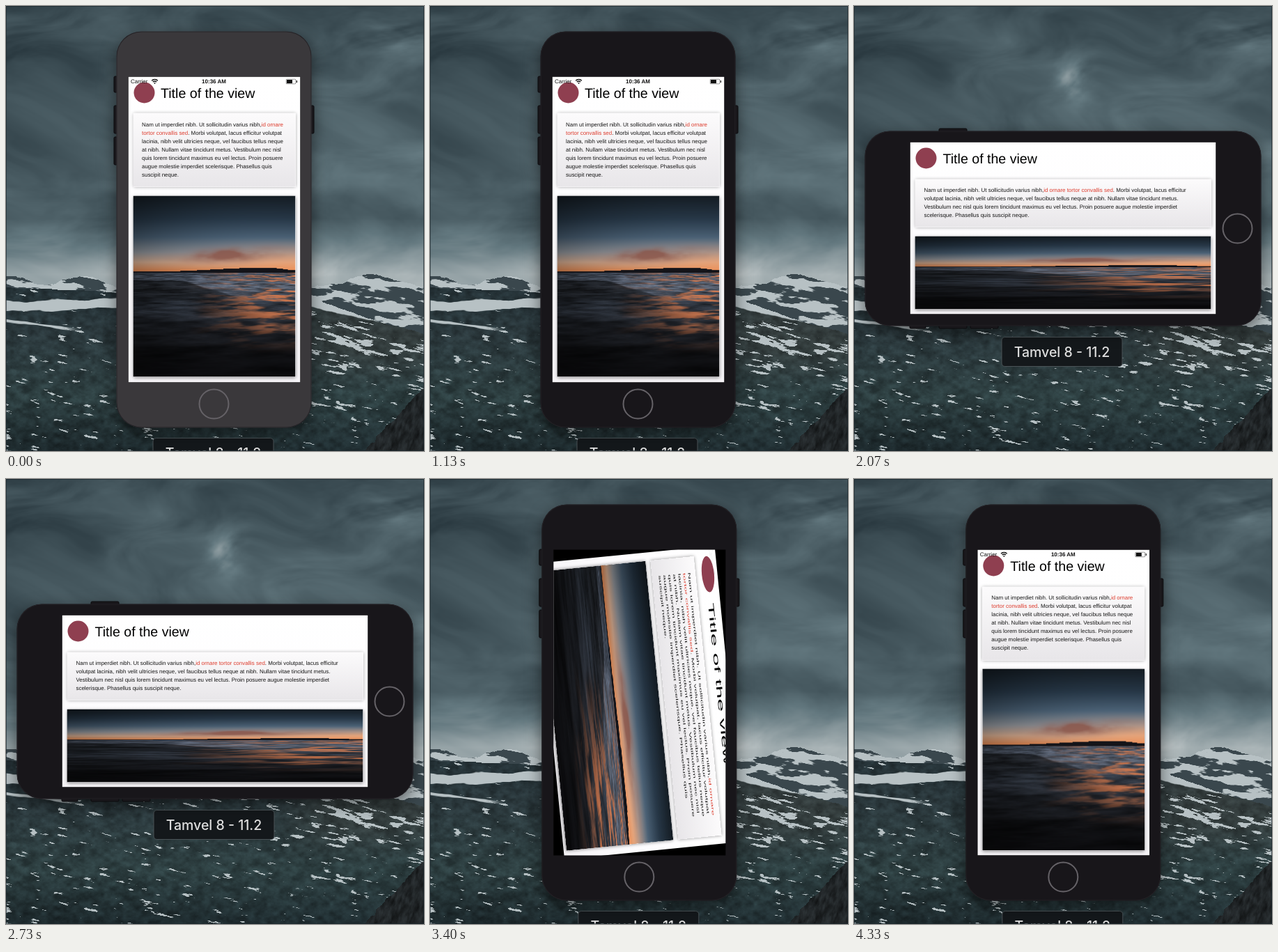
An HTML page with a canvas that plays this animation: 600x639 px, repeating every 4390 ms.

```html
<!DOCTYPE html>
<html lang="en">
<head>
<meta charset="utf-8">
<title>Rotating view</title>
<style>
  html, body { margin: 0; width: 100%; height: 100%; overflow: hidden; background: #2c3d43; }
  #stage { position: absolute; left: 0; top: 0; width: 600px; height: 639px; overflow: hidden; }
  #stage div, #stage canvas, #stage svg { position: absolute; box-sizing: border-box; }
  #edge { inset: 0; border: 1px solid rgba(25, 38, 44, .7); }
  #shade { inset: 0; filter: drop-shadow(0 7px 11px rgba(0, 0, 0, .5)); }
  #phone { left: 0; top: 0; width: 0; height: 0; }
  .key { width: 7.5px; background: #19171b; border: 1px solid #0b0a0c; border-radius: 2px; }
  #body { left: -140px; top: -284.5px; width: 280px; height: 569px; border-radius: 36px;
    background: #18161a; box-shadow: inset 0 0 0 1px #242226; }
  #home { left: -22px; top: 228.5px; width: 44px; height: 44px; border-radius: 50%; border: 2px solid #656267; }
  #screen { left: -123.5px; top: -219.5px; width: 247px; height: 439px; overflow: hidden; background: #000; }
  .view { background: linear-gradient(#fff, #fdfcfe 60%, #f6f4f7); color: #000; }
  .view, #bar { font-family: "Liberation Sans", Arial, sans-serif; text-rendering: geometricPrecision; white-space: pre; }
  .dot { left: 8px; top: 8px; width: 30px; height: 30px; border-radius: 50%; background: #8f3f50; }
  .title { left: 47px; top: 12px; font-size: 19.6px; line-height: 24px; }
  .card { left: 7px; right: 7px; top: 52.5px; background: linear-gradient(#fcfbfc, #e8e6e9);
    box-shadow: 0 0 5px rgba(0, 0, 0, .42); }
  .text { left: 13px; top: 10.5px; font-size: 7.94px; line-height: 12.07px; color: #161616; }
  .text b { font-weight: 400; color: #dd3b2c; }
  .pic { left: 7px; box-shadow: 0 1px 5px rgba(0, 0, 0, .5); }
  #bar { font-size: 8px; line-height: 10px; color: #111; }
  #bar div { top: 2px; }
  #label { width: 174px; height: 43px; border: 1px solid #4b5357; border-radius: 5px; background: #14181b;
    color: #dedede; font: 500 19.5px/42px Inter, "Open Sans", sans-serif; text-align: center; white-space: pre; }
</style>
</head>
<body>
<div id="stage">
  <canvas id="land" width="600" height="639"></canvas>
  <div id="label">Tamvel 8 - 11.2</div>
  <div id="shade">
    <div id="phone">
      <div class="key" style="left:-144.5px;top:-220px;height:24px"></div>
      <div class="key" style="left:-144.5px;top:-178.5px;height:41px"></div>
      <div class="key" style="left:-144.5px;top:-133.5px;height:41px"></div>
      <div class="key" style="left:136px;top:-178.5px;height:41px"></div>
      <div id="body"></div>
      <div id="home"></div>
      <div id="screen">
        <div id="bar">
          <div style="left:4px">Carrier</div>
          <svg style="left:33px;top:3px" width="10" height="8" viewBox="0 0 10 8" fill="none" stroke="#111" stroke-width="1.4">
            <path d="M.6 2.7Q5-1.2 9.4 2.7M2.3 4.6Q5 2.2 7.7 4.6"/><path d="M5 7.6L3.6 6.1Q5 5 6.4 6.1Z" fill="#111" stroke="none"/>
          </svg>
          <div style="left:0;right:0;text-align:center;font-weight:700">10:36 AM</div>
          <svg style="right:4px;top:3px" width="17" height="8" viewBox="0 0 17 8">
            <rect x=".5" y=".5" width="14" height="7" rx="1.5" fill="none" stroke="#777"/>
            <path d="M1.5 1.5H9.5V6.5H1.5ZM15.5 2.5H16.5V5.5H15.5Z" fill="#111"/>
          </svg>
        </div>
      </div>
    </div>
  </div>
  <div id="edge"></div>
</div>
<script>
const LOOP = 4390, STEP = 200 / 3, SPIN = 300, LAG = 45;
const GO = 1437, RETURN = 3354, FOCUS = 270;
const $ = id => document.getElementById(id);
const clamp = v => Math.max(0, Math.min(1, v));
const mix = (a, b, p) => a + (b - a) * p;
const blend = (a, b, p) => a.map((v, i) => mix(v, b[i], p));
const smooth = v => v * v * (3 - 2 * v);
const rise = (v, a, b) => smooth(clamp((v - a) / (b - a)));
const bell = (v, mid, width) => Math.exp(-(((v - mid) / width) ** 2));

// seeded smooth noise
let seed = 11;
const grid = Float32Array.from({ length: 4096 }, () => (seed = seed * 16807 % 2147483647) / 2147483647);
const cell = (i, j) => grid[(i * 157 + j * 1031) & 4095];
function noise(x, y) {
  const i = Math.floor(x), j = Math.floor(y), u = smooth(x - i), v = smooth(y - j);
  return mix(mix(cell(i, j), cell(i + 1, j), u), mix(cell(i, j + 1), cell(i + 1, j + 1), u), v);
}
function fbm(x, y, octaves = 4) {
  let sum = 0, amp = 1, total = 0;
  for (; octaves--; amp /= 2, x = x * 2 + 5.3, y = y * 2 + 1.7) {
    sum += amp * noise(x, y);
    total += amp;
  }
  return sum / total;
}

// colour (or value) along key points [position, ...values]
function along(t, keys) {
  let k = 1;
  while (k < keys.length - 1 && t > keys[k][0]) k++;
  const [a, ...from] = keys[k - 1], [b, ...to] = keys[k];
  return blend(from, to, clamp((t - a) / (b - a)));
}
function paint(canvas, shader) {
  const { width, height } = canvas, c = canvas.getContext('2d');
  const img = c.createImageData(width, height);
  for (let y = 0, i = 0; y < height; y++)
    for (let x = 0; x < width; x++, i += 4) img.data.set([...shader(x, y).map(Math.round), 255], i);
  c.putImageData(img, 0, 0);
}

const SKY = [[0, 32, 46, 53], [.5, 98, 119, 126], [1, 192, 199, 200]];
const SKY_LIGHT = [[0, .24], [100, .27], [200, .33], [255, .42], [305, .33], [345, .58], [385, .85]];
const HILL = [[0, 404], [160, 411], [300, 440], [435, 417], [520, 449], [600, 470]];
const GROUND = [[400, 37, 50, 55], [470, 42, 55, 59], [560, 46, 64, 66], [639, 33, 47, 51]];
const SNOW = [183, 193, 196];

function sky(x, y) {
  const warp = fbm(x / 150, y / 90, 2) * 2;
  const cloud = fbm(x / 100 + warp, y / 52 + warp, 5) - .5;
  const spots = .22 * bell(x, 316, 26) * bell(y, 108, 28) + .16 * bell(x, 555, 60) * bell(y, 38, 26);
  const light = along(y, SKY_LIGHT)[0] + (x - 300) / 6000 + cloud * .42 + spots * (1 + cloud * 4);
  return along(clamp(light), SKY);
}
function farRange(x, y) {
  const height = 17 * bell(x, 105, 35) + 14 * bell(x, 0, 45) + 17 * bell(x, 528, 50);
  if (y < 404 - height + (fbm(x / 16, 3) - .5) * 10) return sky(x, y);
  const patch = fbm(x / 30, (y - .15 * x) / 9) + .14 * bell(x, 555, 40) * bell(y, 430, 14);
  return blend([58, 71, 77], SNOW, rise(patch, .54, .6));
}
function land(x, y) {
  if (639 - y + (fbm(x / 14, y / 14) - .5) * 14 < (x - 515) * 1.1) {
    const n = fbm(x / 5, (x + y) / 9);
    return [30, 34, 36].map(v => v * (.4 + 1.3 * n));
  }
  const top = along(x, HILL)[0] + (fbm(x / 20, 9) - .5) * 4;
  if (y < top) return farRange(x, y);
  const olive = rise(x, 360, 480) * (1 - rise(y, 480, 560));
  const base = blend(along(y, GROUND), [56, 62, 60], olive * .6);
  const shade = .65 + .7 * fbm(x / 9, y / 7) - .15 * bell(y, 640, 60) * bell(x, 60, 200);
  const wob = fbm(x / 35, y / 12);
  const band = (1 - rise(x, 170, 240)) * rise(9 * wob + 3 - Math.abs(y - 431 + x * .03), 0, 1.5);
  const strip = (1 - rise(x, 75, 110)) * rise(5 * wob - Math.abs(y - 451 - x * .13), 0, 1.5);
  const crest = rise(x, 425, 440) * rise((535 - x) * .14 + 1 - (y - top), 0, 2);
  const where = bell(y, 490 + (x - 500) * .16, 32) * rise(x, 300, 520) + .5 * bell(x, 325, 55) * bell(y, 524, 9);
  const streaks = rise(fbm(x / 20, (y - x * .2) / 4.5) + .16 * where, .72, .77);
  return blend(base.map(v => v * shade), SNOW, Math.max(band, strip, crest, streaks));
}

const DUSK = [[0, 25, 35, 44], [.3, 45, 64, 82], [.55, 82, 106, 128], [.75, 158, 162, 168], [.88, 228, 184, 154], [1, 232, 138, 82]];
const WATER = [[0, 66, 75, 90], [.14, 82, 90, 104], [.3, 52, 59, 70], [.5, 30, 33, 39], [.75, 16, 17, 20], [1, 9, 9, 11]];

function sea(x, y) {
  const u = x / 234, v = y / 261, horizon = .415;
  const coast = horizon - .018 * rise(u, .2, .75) + .012 * rise(u, .85, 1);
  if (v < coast) {
    const dim = 1 - .5 * (1 - u) ** 2 * (1 - v) - .2 * u * (1 - v / horizon);
    const warm = blend(along(v / horizon, DUSK), [240, 150, 95], .5 * rise(u, .4, 1) * rise(v, .22, .38));
    const puff = bell(u, .6, .26) * bell(v, .33 - .05 * (u - .5), .035) * fbm(u * 7, v * 22) * 2;
    return blend(warm.map(c => c * dim), [138, 84, 72], clamp(puff) * .85);
  }
  if (v < horizon + .008) return [20, 20, 25];
  const d = (v - horizon) / .585;
  const ripple = fbm(u * 5 / (.25 + d) + d * 9, 22 * Math.log(.12 + d), 5);
  const glint = fbm(u * 4 / (.25 + d) + 7, 17 * Math.log(.12 + d) + u * 3);
  const crest = .46 + .05 * rise(u, .28, .5) + .12 * rise(u, .45, .9);
  const swell = rise(v, crest, crest + .012) * (1 - rise(v, crest + .05, crest + .2)) * (1 - rise(u, .4, .85));
  const shade = (.35 + 1.3 * ripple) * (1 - .55 * swell) * (.65 + .35 * rise(u, 0, .5));
  const fire = rise(u, .3, .95) * (1 - rise(d, .35, .8)) * rise(glint, .42, .7);
  return blend(along(d, WATER).map(c => c * shade), [228, 126, 76], fire * .85);
}

// content
const red = s => `<b>${s}</b>`;
const tall = ['Nam ut imperdiet nibh. Ut sollicitudin varius nibh,' + red('id ornare'),
  red('tortor convallis sed') + '. Morbi volutpat, lacus efficitur volutpat',
  'lacinia, nibh velit ultricies neque, vel faucibus tellus neque',
  'at nibh. Nullam vitae tincidunt metus. Vestibulum nec nisl',
  'quis lorem tincidunt maximus eu vel lectus. Proin posuere',
  'augue molestie imperdiet scelerisque. Phasellus quis', 'suscipit neque.'];
const wide = ['Nam ut imperdiet nibh. Ut sollicitudin varius nibh,' + red('id ornare tortor convallis sed') + '. Morbi volutpat, lacus efficitur',
  'volutpat lacinia, nibh velit ultricies neque, vel faucibus tellus neque at nibh. Nullam vitae tincidunt metus.',
  'Vestibulum nec nisl quis lorem tincidunt maximus eu vel lectus. Proin posuere augue molestie imperdiet',
  'scelerisque. Phasellus quis suscipit neque.'];

const centred = (w, h) => ({
  width: w + 'px', height: h + 'px', left: (247 - w) / 2 + 'px', top: (439 - h) / 2 + 'px'
});
function makeView(w, h, lines, cardH) {
  const el = document.createElement('div'), picY = cardH + 65;
  el.className = 'view';
  Object.assign(el.style, centred(w, h));
  el.innerHTML = `<div class="dot"></div><div class="title">Title of the view</div>
<div class="card" style="height:${cardH}px"><div class="text">${lines.join('\n')}</div></div>
<canvas class="pic" width="234" height="261" style="top:${picY}px;width:${w - 14}px;height:${h - 7.5 - picY}px"></canvas>`;
  $('screen').insertBefore(el, $('bar'));
  paint(el.querySelector('canvas'), sea);
  return { el, w, h };
}

const upright = makeView(247, 439, tall, 106);
const lying = makeView(439, 247, wide, 69.5);
paint($('land'), land);

function draw(t) {
  // the device turns at once, its content follows
  const turned = t >= GO - LAG && t < RETURN - LAG;
  const x = turned ? 299.5 : t < GO ? 298.5 : 300.3;
  $('phone').style.transform = turned ? `translate(${x}px,319.5px) rotate(-90deg)` : `translate(${x}px,320.5px)`;
  $('label').style.transform = `translate(${x - 88}px,${turned ? 475 : 620}px)`;
  $('body').style.background = t < FOCUS ? '#3a383b' : '#18161a';

  // the layout swaps first, then its frame turns and resizes
  const flip = rise(t, GO, GO + SPIN) - rise(t, RETURN, RETURN + SPIN);
  const view = t >= GO && t < RETURN ? lying : upright;
  const w = mix(247, 439, flip), h = mix(439, 247, flip), spin = `rotate(${90 * flip}deg)`;
  for (const v of [upright, lying]) v.el.style.visibility = v === view ? 'visible' : 'hidden';
  view.el.style.transform = `${spin} scale(${w / view.w},${h / view.h})`;
  Object.assign($('bar').style, centred(w, h), { transform: spin, opacity: 1 - flip });
}

const begin = performance.now();
function tick() {
  const t = Math.max(0, performance.now() - begin) % LOOP;
  draw(Math.floor((t + 3.4) / STEP) * STEP);
  requestAnimationFrame(tick);
}
tick();
</script>
</body>
</html>
```
